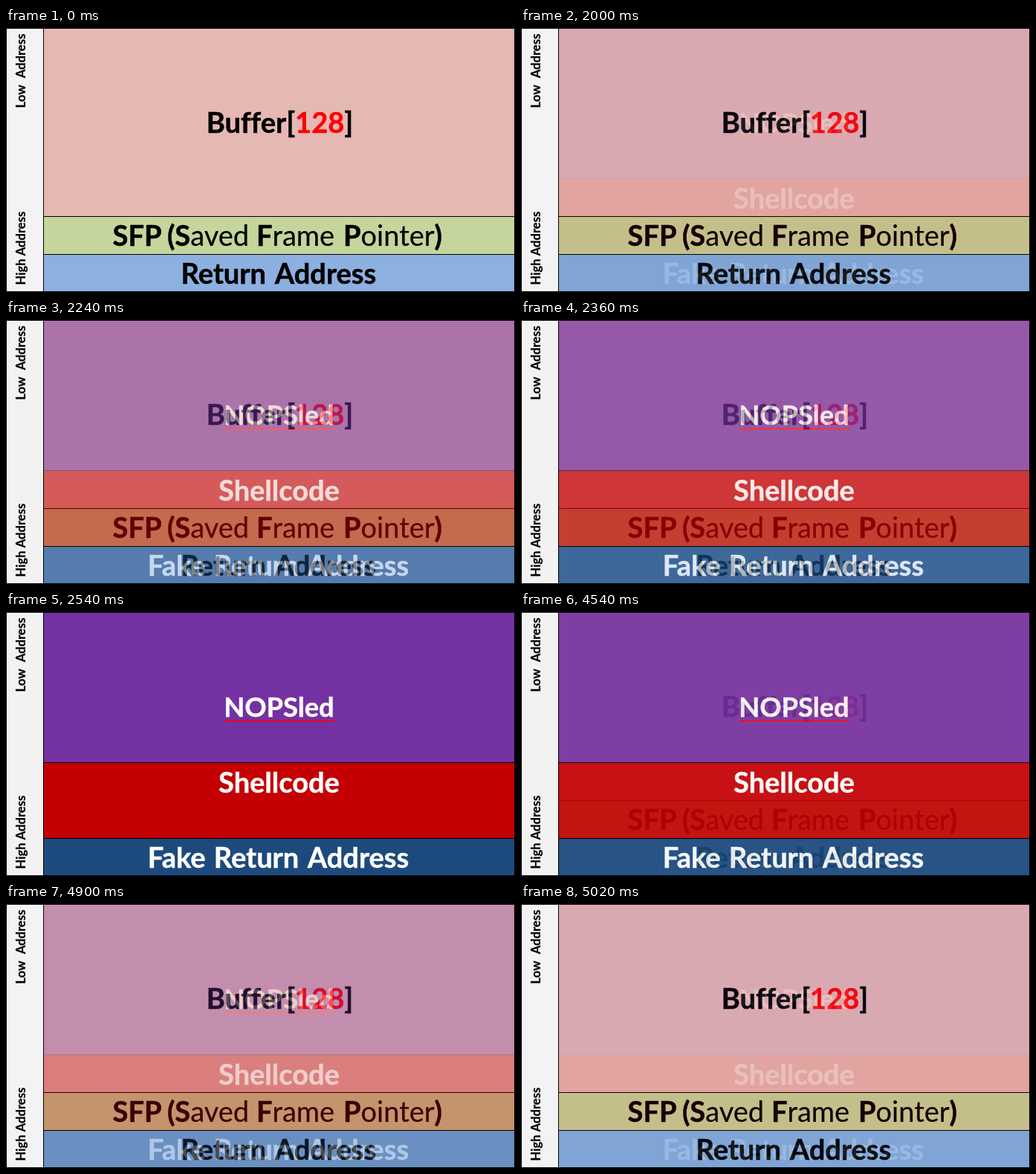
An HTML page for the animation above (5.08 s loop, 685x355 px).

```html
<!DOCTYPE html>
<html lang="en">
<head>
<meta charset="utf-8">
<title>Stack layout</title>
<style>
  html, body { margin: 0; width: 100%; height: 100%; overflow: hidden; background: #fff; }
  svg { display: block; width: 685px; height: 355px; }
  text {
    font: 700 38px Lato, "Open Sans", sans-serif;
    font-variant-ligatures: none;
    text-anchor: middle;
    stroke: #000;
    stroke-width: .5px;
  }
  .side text { font-size: 16.6px; stroke-width: .2px; }
  .thin { font-weight: 400; stroke-width: .2px; }
  .red { fill: #f00; stroke: #f00; }
  .light text { fill: #fff; stroke: #fff; }
  .light .caps { font-size: 36.3px; }
  .line { fill: none; stroke: #000; }
</style>
</head>
<body>
<svg viewBox="0 0 685 355">
  <g>
    <rect width="685" height="355" fill="#f4f2f5"/>
    <rect x="50" width="635" height="253" fill="#e6b8b4"/>
    <rect x="50" y="253" width="635" height="51" fill="#c4d69b"/>
    <rect x="50" y="304" width="635" height="51" fill="#8cb0e0"/>
    <path class="line" d="M50 253.5H685M50 304.5H685"/>
    <text x="368.5" y="141">Buffer[<tspan class="red">128</tspan>]</text>
    <text x="176.5" y="293">SFP</text>
    <text x="272" y="293">(S<tspan class="thin">aved</tspan></text>
    <text x="389.5" y="293">F<tspan class="thin">rame</tspan></text>
    <text x="520.5" y="293">P<tspan class="thin">ointer</tspan>)</text>
    <text x="292.7" y="344">Return</text>
    <text x="430" y="344">Address</text>
  </g>
  <g id="attack" class="light" opacity="0">
    <rect width="685" height="355" fill="#f2f2f2"/>
    <rect x="50" width="635" height="203" fill="#7431a2"/>
    <rect x="50" y="203" width="635" height="101" fill="#c40003"/>
    <rect x="50" y="304" width="635" height="51" fill="#1d4a7c"/>
    <path class="line" d="M50 202.5H685M50 304.5H685"/>
    <text class="caps" x="367.5" y="141">NOPSled</text>
    <rect x="294" y="145" width="148" height="2" fill="#f00"/>
    <text x="367.5" y="243">Shellcode</text>
    <text x="229.7" y="344">Fake</text>
    <text x="337" y="344">Return</text>
    <text x="474" y="344">Address</text>
  </g>
  <g class="side">
    <text transform="translate(25.5 92) rotate(-90)">Low</text>
    <text transform="translate(25.5 37.5) rotate(-90)">Address</text>
    <text transform="translate(25.5 328) rotate(-90)">High</text>
    <text transform="translate(25.5 276.5) rotate(-90)">Address</text>
  </g>
  <path class="line" d="M.5 .5H684.5V354.5H.5ZM50.5 0V355"/>
</svg>
<script>
  const LOOP = 5080, HOLD = 2000, STEP = 60, STEPS = 10;
  const FADE_BACK = HOLD + (STEPS - 1) * STEP + HOLD;
  const attack = document.getElementById("attack");

  // Fade level rises in tenths, starting at the given time.
  const fade = (time, start) =>
    Math.max(0, Math.min(STEPS, Math.floor((time - start) / STEP) + 1)) / STEPS;

  function render(now) {
    const time = now % LOOP;
    attack.setAttribute("opacity", fade(time, HOLD) - fade(time, FADE_BACK));
  }

  const start = performance.now();
  function tick() {
    render(performance.now() - start);
    requestAnimationFrame(tick);
  }
  tick();
</script>
</body>
</html>
```
